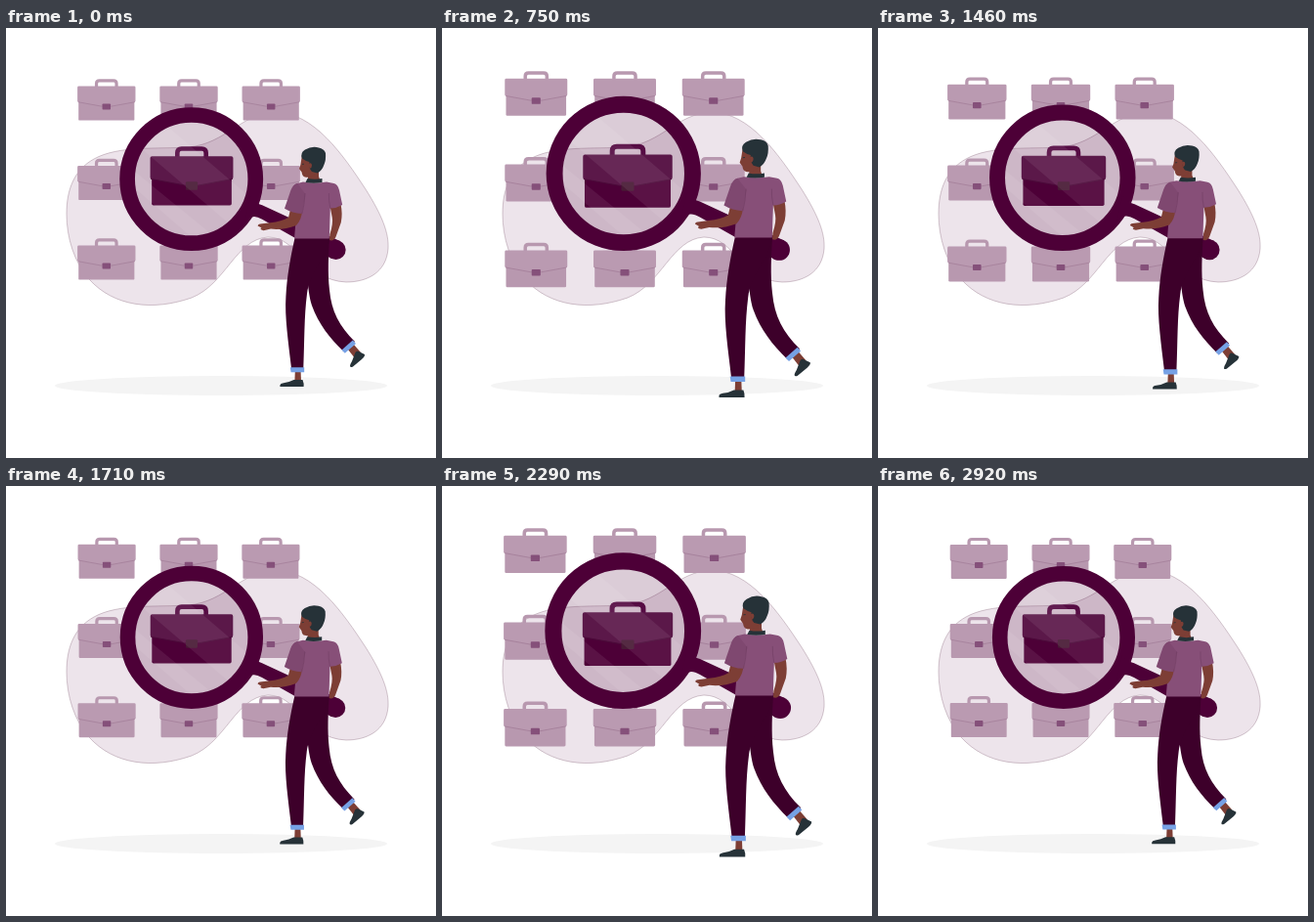
An HTML page with a canvas that plays this animation: 440x440 px, repeating every 2960 ms.

```html
<!DOCTYPE html>
<html lang="en">
<head>
<meta charset="utf-8">
<title>Job search</title>
<style>
html, body { margin: 0; width: 100%; height: 100%; overflow: hidden; background: #fff; }
canvas { display: block; width: 440px; height: 440px; }
</style>
</head>
<body>
<canvas id="stage"></canvas>
<script>
const SIZE = 440, LOOP = 2960;
const canvas = document.getElementById('stage');
const ctx = canvas.getContext('2d');
const ratio = Math.max(1, window.devicePixelRatio || 1);
canvas.width = canvas.height = SIZE * ratio;

const PLUM = '#4d0037', PANTS = '#3d002a', SHIRT = '#874f78', SLEEVE = '#7f4870';
const SKIN = '#7d3e35', INK = '#263238', CUFF = '#76a1e5';

// time in ms, zoom
const ZOOM = [[0, 1.006], [290, 1.057], [560, 1.1], [750, 1.084], [1080, 1.053],
  [1460, 1.024], [1695, 1], [2325, 1.1], [2710, 1.034], [2925, 1], [LOOP, 1.006]];

function zoomAt(t) {
  const i = ZOOM.findIndex(k => k[0] > t);
  const [t0, a] = ZOOM[i - 1], [t1, b] = ZOOM[i];
  return a + (b - a) * (t - t0) / (t1 - t0);
}

const blob = new Path2D('M62 190C62 165 70 145 90 134C115 120 155 124 187 122' +
  'C225 118 240 88 275 86C315 86 345 130 368 165C385 192 392 210 391 226' +
  'C389 250 370 260 348 260C305 258 300 214 268 214C235 216 225 262 190 276' +
  'C150 290 110 285 85 257C70 240 62 215 62 190Z');

// briefcase, centred on 0,0
const caseBody = new Path2D('M-28.4 -12H28.4V19.8Q28.4 21 27.2 21H-27.2Q-28.4 21 -28.4 19.8Z');
const caseFlap = new Path2D('M-28.2 -14H28.2Q29.5 -14 29.5 -12.7V1.2Q29.4 2.2 28 2.4L5 6.6H-5L-28 2.4Q-29.4 2.2 -29.5 1.2V-12.7Q-29.5 -14 -28.2 -14Z');
const caseEdge = new Path2D('M-29 1.8Q-28.6 2.3 -28 2.4L-5 6.6H5L28 2.4Q28.6 2.3 29 1.8');
const caseGrip = new Path2D('M-10.2 -13V-16.4Q-10.2 -19.4 -7.2 -19.4H7.2Q10.2 -19.4 10.2 -16.4V-13');
const caseClasp = new Path2D('M-3.4 4H3.4Q4.2 4 4.2 4.8V9.2Q4.2 10 3.4 10H-3.4Q-4.2 10 -4.2 9.2V4.8Q-4.2 4 -3.4 4Z');

const smallLook = { body: '#b898af', flap: '#ba9ab1', edge: '#a17c97', grip: '#b898af', clasp: '#85507a' };
const bigLook = { body: PLUM, flap: '#5b1849', edge: '#4b0a39', grip: '#560c44', clasp: '#481a35' };

// walker, back to front
const walker = [
  [SKIN, 'M350 329L356 324L363 332L357 338Z'],
  [INK, 'M357.5 332Q359 330 361 331L367 334Q367.5 336 364 339L355 346.4Q352.5 347.6 352 346Q351.8 344.6 354 341Z'],
  [PANTS, 'M309 215H331C330 232 329 250 331 268C333 290 341 305 357 321L345.5 331C331 317 320 303 313 284C308 268 307 240 309 215Z'],
  [CUFF, 'M343.5 329.5L354.8 319.6L358 323L346.8 332.8Z'],
  [SKIN, 'M295.8 351H301.6L302 362H295.4Z'],
  [INK, 'M280.4 367V365.4Q280.6 363.8 284 363.2Q290 362.4 294.5 360H303.5Q305 363.5 304.6 367Z'],
  [PANTS, 'M295.5 215H331L326 232C314 250 309 262 308 272C305 295 305.5 320 304.3 348H292C289 322 285 295 286.4 275C287.5 254 291 235 295.5 215Z'],
  [CUFF, 'M290.8 347.2H305.2V352.2H291.6Z'],
  [SKIN, 'M331.5 182L342.5 180Q344.6 190 342.8 199L337.4 214Q335 218.6 331 217L331.4 211Q335 200 333.8 194Z'],
  [SKIN, 'M309 144H320V152Q321 156 323 157H309Z'],
  [SHIRT, 'M304 157.5Q316 159.4 328 157.5L335.5 159Q339.6 160 341 166L344.2 181Q338 184.6 331.8 184.6L330.8 215.4H295L297.5 186L295 180L293.5 164Q294 160 298 159Z'],
  [SKIN, 'M291 186L303 187Q302.6 196 297 202Q284 207 271 205.6L263.5 207.2Q258.5 206 261.5 204.6L257.6 202.4Q258 200.2 262 200.2L270.5 199.2Q282 198 289 194Z'],
  [SLEEVE, 'M298 159Q293.4 160.4 291.4 166L285 184.8Q293 189.6 302.6 190L306.5 170Z'],
  [INK, 'M308.5 154Q316 155.6 323.5 154V158Q315 159.4 306.5 158Z'],
  [SKIN, 'M303 130L317 132L318 148Q312 154 306 152.6Q303.2 152 302.6 147.6L300 144Q301.8 140 302 136Z'],
  [INK, 'M303 133.4Q300.6 128 306 124.6Q313 120.4 320 122.4Q325.6 123.4 327 128Q327.6 135 325.4 140Q323.4 146 318.6 148.4L313 147Q309.4 143 310.4 137Q307 136.4 303 133.4Z'],
  [SKIN, 'M309.4 139Q312.6 137 313 140.4Q313 143.4 310.6 144Z']
].map(([color, d]) => [color, new Path2D(d)]);
const creases = new Path2D('M303 190Q305.6 180 306 169M331.8 184.6Q330 176 330.4 169');
const eye = new Path2D('M303 139.4L305 139.2');

const handle = new Path2D('M250 173Q256 180 262 181.4L341.6 218.2L332.6 236L262 196Q256 192.6 252.6 193.4Q248 195 244 199Z');
const glare = new Path2D('M132 118L156 93L262 184L242 212ZM118 152L126 142L214 214L204 226Z');

function zoomed(s, x, y, draw) {
  ctx.save();
  ctx.translate(x, y);
  ctx.scale(s, s);
  ctx.translate(-x, -y);
  draw();
  ctx.restore();
}

function fill(color, path) {
  ctx.fillStyle = color;
  ctx.fill(path);
}

function line(color, width, path) {
  ctx.strokeStyle = color;
  ctx.lineWidth = width;
  ctx.stroke(path);
}

function disc(x, y, r) {
  const p = new Path2D();
  p.arc(x, y, r, 0, Math.PI * 2);
  return p;
}

function briefcase(x, y, k, look) {
  ctx.save();
  ctx.translate(x, y);
  ctx.scale(k, k);
  line(look.grip, 3.2, caseGrip);
  fill(look.body, caseBody);
  fill(look.flap, caseFlap);
  line(look.edge, 0.7, caseEdge);
  fill(look.clasp, caseClasp);
  ctx.restore();
}

function drawBlob() {
  fill('#ede4eb', blob);
  line('rgba(110, 70, 95, .6)', 0.5, blob);
}

const lens = disc(190, 155, 58), ring = disc(190, 155, 65.2);

function drawLens(s) {
  const k = s - 1;
  ctx.save();
  ctx.clip(disc(190 - 50.5 * k, 155 - 72 * k, 58 * s));
  ctx.fillStyle = '#fff';
  ctx.fillRect(0, 0, SIZE, SIZE);
  drawBlob();
  ctx.fillStyle = 'rgba(77, 0, 55, .2)';
  ctx.fillRect(0, 0, SIZE, SIZE);
  ctx.restore();
}

function drawGlass() {
  ctx.save();
  ctx.clip(lens);
  fill('rgba(255, 255, 255, .07)', glare);
  ctx.restore();
  line(PLUM, 15.6, ring);
  fill(PLUM, handle);
  fill(PLUM, disc(337, 227, 10));
}

function drawWalker() {
  for (const [color, path] of walker) fill(color, path);
  line('#6d3b60', 0.5, creases);
  line(INK, 0.8, eye);
}

function render(t) {
  const s = zoomAt(t);
  ctx.setTransform(ratio, 0, 0, ratio, 0, 0);
  ctx.fillStyle = '#fff';
  ctx.fillRect(0, 0, SIZE, SIZE);
  drawBlob();
  ctx.fillStyle = '#f4f4f4';
  ctx.beginPath();
  ctx.ellipse(220, 366, 170, 10, 0, 0, Math.PI * 2);
  ctx.fill();

  zoomed(s, 187, 157.5, () => {
    for (let i = 0; i < 9; i++) {
      briefcase(103.3 + 83.7 * (i % 3), 74 + 81 * Math.floor(i / 3), 1, smallLook);
    }
  });
  drawLens(s);
  zoomed(s, 190, 153, () => briefcase(190, 151.4, 1.43, bigLook));
  zoomed(s, 240.5, 227, drawGlass);
  zoomed(s / 1.006, 240.5, 226, drawWalker);
}

let start;
function tick(now) {
  if (start === undefined) start = now;
  render(Math.max(0, now - start) % LOOP);
  requestAnimationFrame(tick);
}
render(0);
requestAnimationFrame(tick);
</script>
</body>
</html>
```
